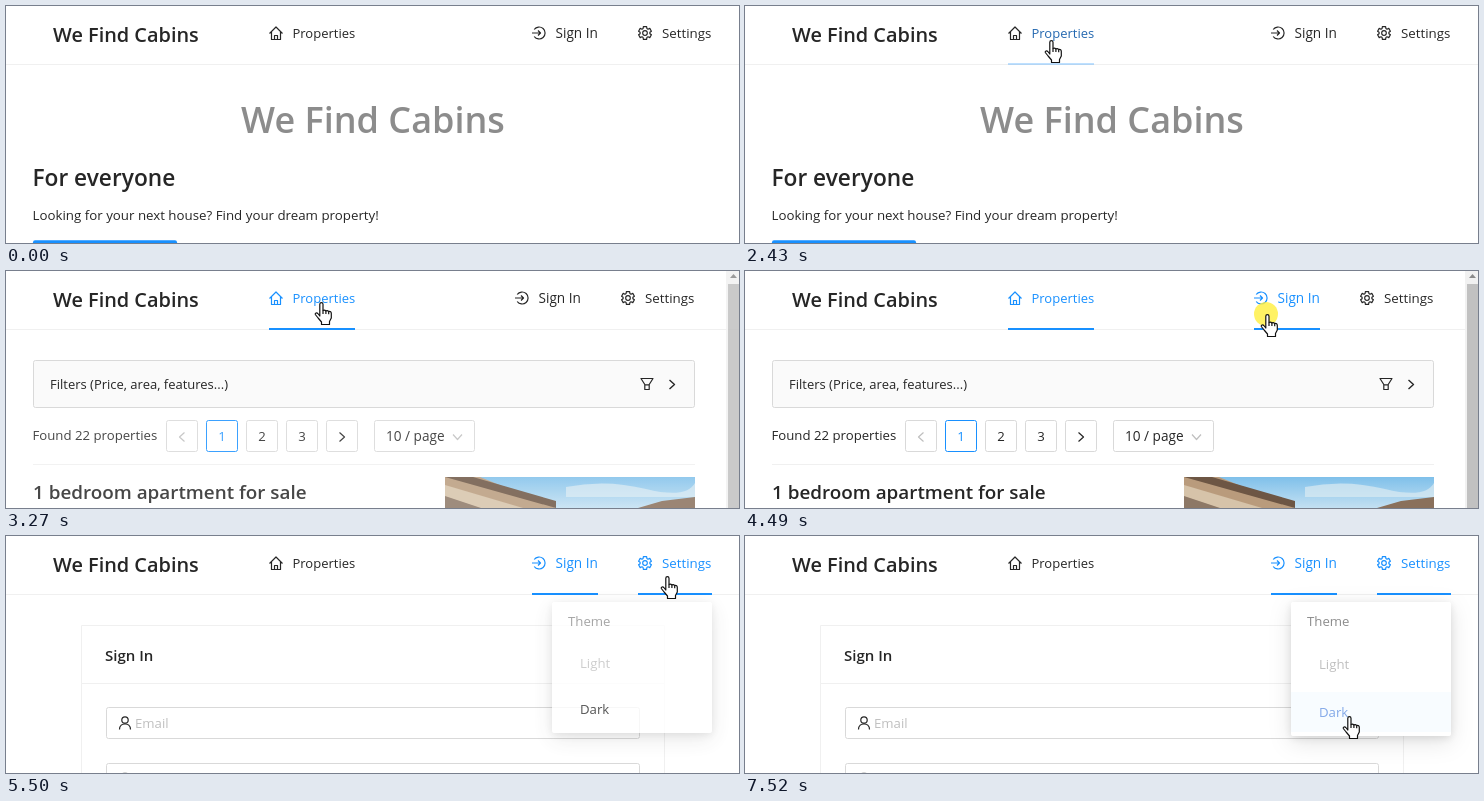
Write an HTML page that moves like this. It is 733 px wide and 237 px high and loops after 8000 ms.

```html
<!DOCTYPE html>
<html lang="en">
<head>
<meta charset="utf-8">
<title>Property listings</title>
<style>
html, body { margin: 0; width: 100%; height: 100%; overflow: hidden; background: #fff; }
svg { display: block; width: 733px; height: 237px; color: #262626; }
text { font: 13.2px "Open Sans", "Noto Sans", sans-serif; fill: currentColor; }
.brand { font-size: 19.9px; font-weight: 600; }
.hero { font-size: 36px; font-weight: 600; fill: #8c8c8c; text-anchor: middle; }
.h2 { font-size: 22.7px; font-weight: 600; }
.h3 { font-size: 18.85px; font-weight: 600; }
.h4 { font-size: 15px; font-weight: 600; }
.lead { font-size: 13.3px; }
.small { font-size: 13px; }
.wide { font-size: 13.6px; }
.mid { text-anchor: middle; }
.icon { fill: none; stroke: currentColor; stroke-width: 1.2; stroke-linejoin: round; }
.box { fill: #fff; stroke: #d9d9d9; }
.line { fill: #f0f0f0; }
.bar { fill: #1890ff; }
.dim { color: #bfbfbf; }
.on { color: #1890ff; }
.on .box { stroke: #1890ff; }

/* every state is held until the next keyframe */
.a { animation: 8s step-end infinite; }

.home { animation-name: home; }
.list { animation-name: list; }
.results { animation-name: results; }
.login { animation-name: login; }
.shift { animation-name: shift; }
.filter { animation-name: filter; }
.navHome { animation-name: navHome; }
.navIcon { animation-name: navIcon; }
.barHome { animation-name: barHome; }
.navSign { animation-name: navSign; }
.barSign { animation-name: barSign; }
.navSet { animation-name: navSet; }
.barSet { animation-name: barSet; }
.menu { animation-name: menu; }
.panel { fill: #fff; filter: drop-shadow(0 2px 4px #0000001a) drop-shadow(0 6px 11px #0000001c); animation-name: panel; }
.drop { animation-name: drop; }
.dark { animation-name: dark; }
.row { fill: #f8fcff; animation-name: row; }
.pointer { animation-name: pointer; }
.arrow { animation-name: arrow; }
.hand { animation-name: hand; }
.click { animation-name: click; }
.skin { fill: #fff; stroke: #111; stroke-width: 1.2; stroke-linejoin: round; }

@keyframes home { 0% { opacity: 1 } 38.125%, 100% { opacity: 0 } }
@keyframes list { 0% { opacity: 0 } 38.125% { opacity: .6 } 40.875% { opacity: 1 } 58.5%, 100% { opacity: 0 } }
@keyframes results { 0% { opacity: 0 } 40.875% { opacity: .85 } 43.375% { opacity: 1 } 58.5%, 100% { opacity: 0 } }
@keyframes login { 0% { opacity: 0 } 58.5% { opacity: .8 } 61%, 100% { opacity: 1 } }
@keyframes shift {
  0% { transform: none } 40.875% { transform: translateX(-17px) } 58.5%, 100% { transform: none }
}
@keyframes filter { 0% { width: 678px } 40.875% { width: 661px } 58.5%, 100% { width: 678px } }
@keyframes navHome { 0% { color: #262626 } 30.375% { color: #2468b0 } 33.125% { color: #1890ff } 58.5%, 100% { color: #262626 } }
@keyframes navIcon { 0% { color: #262626 } 33.125% { color: #1890ff } 58.5%, 100% { color: #262626 } }
@keyframes barHome { 0% { opacity: 0 } 30.375% { opacity: .28 } 33.125% { opacity: 1 } 58.5%, 100% { opacity: 0 } }
@keyframes navSign { 0% { color: #262626 } 53.375% { color: #2468b0 } 56.125%, 100% { color: #1890ff } }
@keyframes barSign { 0% { opacity: 0 } 53.375% { opacity: .28 } 56.125%, 100% { opacity: 1 } }
@keyframes navSet { 0% { color: #262626 } 66.125% { color: #2468b0 } 68.75%, 100% { color: #1890ff } }
@keyframes barSet { 0% { opacity: 0 } 66.125% { opacity: .28 } 68.75%, 100% { opacity: 1 } }
@keyframes menu { 0% { opacity: 0 } 68.75% { opacity: .78 } 71.25%, 100% { opacity: 1 } }
@keyframes panel { 0% { height: 131px } 71.25%, 100% { height: 134px } }
@keyframes drop { 0% { transform: translateY(var(--rise)) } 71.25%, 100% { transform: none } }
@keyframes dark { 0% { color: #262626 } 91.5% { color: #5a74ad } 94%, 100% { color: #83a8e8 } }
@keyframes row { 0% { opacity: 0 } 91.5% { opacity: .6 } 94%, 100% { opacity: 1 } }
@keyframes pointer {
  0% { transform: translate(171px, 149px) }
  15.25% { transform: translate(216px, 78px) }
  17.75% { transform: translate(240px, 30px) }
  20.375% { transform: translate(243px, 38px) }
  25.375% { transform: translate(270px, 38px) }
  27.875% { transform: translate(299px, 38px) }
  30.375% { transform: translate(300px, 34px) }
  33.125% { transform: translate(309px, 31px) }
  48.375% { transform: translate(340px, 33px) }
  50.875% { transform: translate(455px, 40px) }
  53.375% { transform: translate(514px, 43px) }
  56.125% { transform: translate(516px, 43px) }
  63.625% { transform: translate(568px, 42px) }
  66.125% { transform: translate(640px, 41px) }
  68.75% { transform: translate(655px, 40px) }
  76.25% { transform: translate(651px, 58px) }
  78.75% { transform: translate(642px, 88px) }
  81.375% { transform: translate(625px, 122px) }
  83.875% { transform: translate(612px, 150px) }
  86.5% { transform: translate(601px, 165px) }
  89%, 100% { transform: translate(598px, 180px) }
}
@keyframes arrow {
  0% { opacity: 0 } 12.625% { opacity: 1 } 25.375% { opacity: 0 }
  50.875% { opacity: 1 } 53.375% { opacity: 0 }
  78.75% { opacity: 1 } 86.5%, 100% { opacity: 0 }
}
@keyframes hand {
  0% { opacity: 0 } 25.375% { opacity: 1 } 50.875% { opacity: 0 }
  53.375% { opacity: 1 } 78.75% { opacity: 0 } 86.5%, 100% { opacity: 1 }
}
@keyframes click {
  0% { opacity: 0 } 35.625% { opacity: .8 } 38.125% { opacity: 0 }
  56.125% { opacity: .8 } 58.5%, 100% { opacity: 0 }
}
</style>
</head>
<body>
<svg viewBox="0 0 733 237">
  <defs>
    <linearGradient id="sky" x2="0" y2="1">
      <stop offset="0" stop-color="#7fc0ea"/><stop offset="1" stop-color="#c3e0f2"/>
    </linearGradient>
    <clipPath id="crop"><path d="M439 206h250v31H439z"/></clipPath>
  </defs>

  <rect class="line" y="58" width="733" height="1"/>

  <g class="a home">
    <text class="hero" x="367" y="127">We Find Cabins</text>
    <text class="h2" x="26.5" y="180">For everyone</text>
    <text class="lead" x="26.5" y="214">Looking for your next house? Find your dream property!</text>
    <rect class="bar" x="27" y="234.3" width="144" height="32" rx="2"/>
  </g>

  <g class="a list">
    <rect class="box a filter" x="27.5" y="89.5" width="678" height="47" rx="2" style="fill:#fafafa"/>
    <text class="small" x="44" y="118">Filters (Price, area, features...)</text>
    <g class="icon a shift">
      <path d="M652 107.5h12l-3.8 6v5h-4.4v-5zM655.8 113.8h4.4"/>
      <path d="M680.5 109l5 4.5-5 4.5" stroke-width="1.4"/>
    </g>
  </g>

  <g class="a results">
    <text x="26.5" y="169">Found 22 properties</text>
    <g class="dim">
      <rect class="box" x="160.5" y="149.5" width="31" height="31" rx="2"/>
      <path class="icon" d="M178.5 161.5l-5 4.5 5 4.5"/>
    </g>
    <g class="on">
      <rect class="box" x="200.5" y="149.5" width="31" height="31" rx="2"/>
      <text class="mid" x="216" y="170">1</text>
    </g>
    <rect class="box" x="240.5" y="149.5" width="31" height="31" rx="2"/>
    <text class="mid" x="256" y="170">2</text>
    <rect class="box" x="280.5" y="149.5" width="31" height="31" rx="2"/>
    <text class="mid" x="296" y="170">3</text>
    <rect class="box" x="320.5" y="149.5" width="31" height="31" rx="2"/>
    <path class="icon" d="M333.5 161.5l5 4.5-5 4.5"/>
    <rect class="box" x="368.5" y="149.5" width="100" height="31" rx="2"/>
    <text class="wide" x="380" y="170">10 / page</text>
    <path class="icon dim" d="M447 163.5l4.5 5 4.5-5"/>
    <rect class="line" x="27" y="193" width="662" height="1"/>
    <text class="h3" x="27" y="228">1 bedroom apartment for sale</text>
    <g clip-path="url(#crop)">
      <path d="M439 206h250v31H439z" fill="url(#sky)"/>
      <path d="M560 216q40-8 80 2t49-6v14H560z" fill="#dcebf3" opacity=".7"/>
      <path d="M439 206h35l76 31H439z" fill="#b99b7c"/>
      <path d="M439 206h28l83 24v7z" fill="#6d5644"/>
      <path d="M439 214l78 23h-78z" fill="#d6c3a9"/>
      <path d="M439 225l36 12h-36z" fill="#8d7866"/>
      <path d="M632 237l24-7 33-4v11z" fill="#8a705b"/>
    </g>
    <rect x="720" width="13" height="237" fill="#f1f1f1"/>
    <rect x="722" y="13" width="11" height="224" fill="#c1c1c1"/>
    <path d="M724 7l3.5-4 3.5 4z" fill="#8a8a8a"/>
  </g>

  <g class="a login">
    <path d="M75.5 237V89.5H658.5V237M75.5 147.5H658.5" fill="none" stroke="#f0f0f0"/>
    <text class="h4" x="99" y="124.5">Sign In</text>
    <rect class="box" x="100.5" y="171.5" width="533" height="31" rx="2"/>
    <g class="icon">
      <circle cx="119" cy="184" r="3.2"/>
      <path d="M113.5 193.5c0-7.6 11-7.6 11 0"/>
    </g>
    <text class="dim" x="129" y="192">Email</text>
    <rect class="box" x="100.5" y="227.5" width="533" height="31" rx="2"/>
    <path class="icon dim" d="M116 240v-1c0-3 6-3 6 0v1"/>
  </g>

  <text class="brand" x="47" y="36">We Find Cabins</text>
  <path class="icon a navIcon" d="M263.5 27.5l6.500-6.500 6.500 6.500M265.5 26v7.500h9V26M268.5 33.500V29.500h3v4"/>
  <text class="a small navHome" x="286.5" y="32">Properties</text>
  <rect class="bar a barHome" x="263" y="57" width="86" height="2"/>

  <g class="a shift">
    <g class="a navSign">
      <path class="icon" d="M528.2 23.5A6 6 0 1 1 528.2 30.5M526 27h8M532 24.5l2.5 2.5-2.5 2.5"/>
      <text class="wide" x="549.5" y="32">Sign In</text>
    </g>
    <rect class="bar a barSign" x="526" y="57" width="66" height="2"/>
    <g class="a navSet">
      <g class="icon" transform="translate(639 27)">
        <circle r="2.3"/>
        <path d="M-1.6-6.4h3.2l.3 1.900 1.100.7 1.800-.8 1.600 2.800-1.500 1.100v1.400l1.500 1.100-1.600 2.800-1.800-.8-1.100.7-.3 1.900h-3.200l-.3-1.900-1.100-.7-1.800.8-1.600-2.800 1.500-1.100v-1.400l-1.500-1.100 1.600-2.800 1.800.8 1.100-.7z"/>
      </g>
      <text class="lead" x="656" y="32">Settings</text>
    </g>
    <rect class="bar a barSet" x="632" y="57" width="74" height="2"/>
  </g>

  <g class="a menu">
    <rect class="a panel" x="546" y="66" width="160" height="134" rx="2"/>
    <rect class="row a" x="546" y="156" width="160" height="40"/>
    <text x="562" y="90" style="color:#8c8c8c">Theme</text>
    <g class="a drop" style="--rise:-1px"><text class="dim" x="574" y="133">Light</text></g>
    <g class="a drop" style="--rise:-3px"><text class="a dark" x="574" y="181">Dark</text></g>
  </g>

  <g class="a pointer">
    <circle class="a click" cx="5" r="12" fill="#ffef3e"/>
    <path class="skin a arrow" d="M0 0v16l3.7-3.5 2.6 6 2.5-1-2.6-5.8h5.3z"/>
    <g class="a hand">
      <path class="skin" d="M4.8 14V2.200a1.600 1.600 0 0 1 3.200 0V8.500q1.600-1 2.900.4 1.700-.8 2.800.6 2.600-.4 2.600 2V16l-1.800 3.500v3H6.500V20l-3.400-4L.3 12.500c-.4-1.600 1.400-2.200 2.500-1z"/>
      <path class="skin" d="M8 8.500v3.500M10.900 9v3M13.700 9.600v2.600" fill="none"/>
    </g>
  </g>
</svg>
</body>
</html>
```
